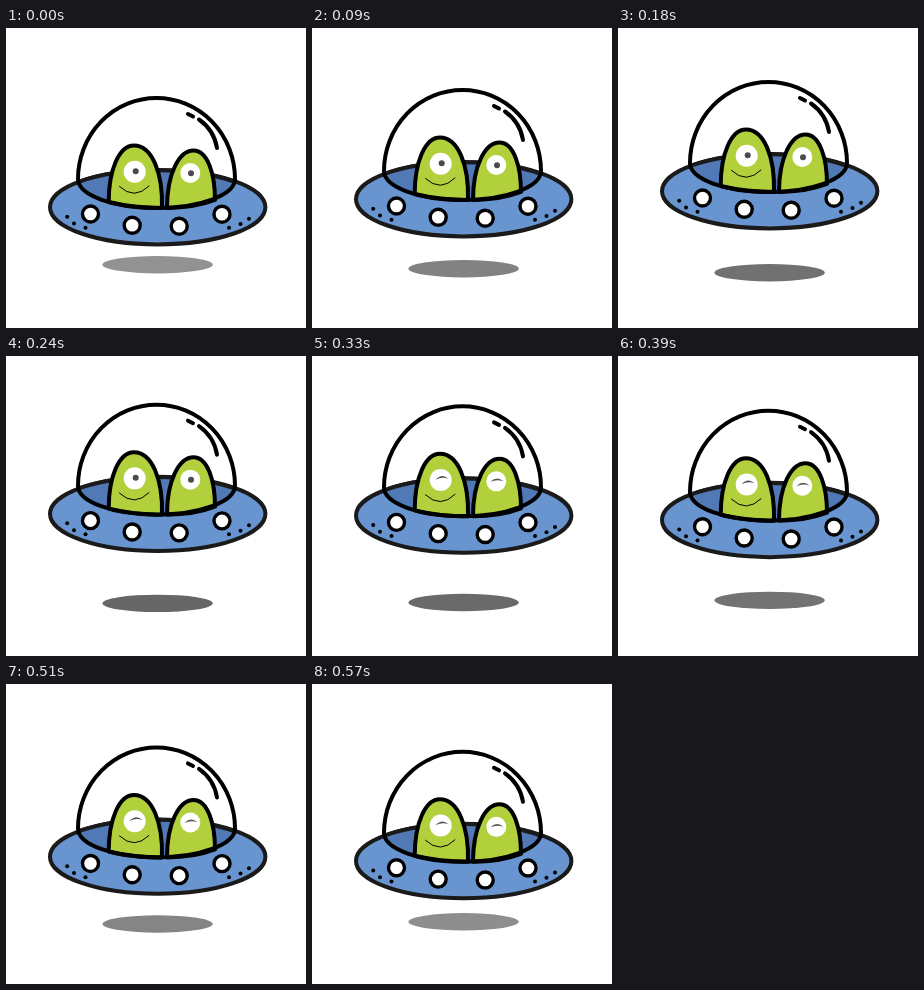
Write an HTML page that moves like this. It is 300 px wide and 300 px high and loops after 0.6 s.

```html
<!DOCTYPE html>
<html lang="en">
<head>
<meta charset="utf-8">
<title>Flying saucer</title>
<style>
html, body { margin: 0; width: 100%; height: 100%; overflow: hidden; background: #fff; }
svg { display: block; width: 100%; height: 100%; }
</style>
</head>
<body>
<svg viewBox="0 0 300 300">
  <ellipse id="shadow" cx="151.6" cy="236.7" rx="55.2" ry="8.7"/>
  <g id="ship" fill="none" stroke="#000" stroke-width="4" stroke-linecap="round" stroke-linejoin="round">
    <ellipse cx="151.7" cy="179.2" rx="107.7" ry="37.2" fill="#6894d0" stroke="#1a1a1a"/>
    <path d="M72.5 153.8A107.7 37.2 0 0 1 228.5 153.8A78.5 29 0 0 1 72.5 153.8Z" fill="#5079b6" stroke="none"/>
    <path d="M72.5 153.8A107.7 37.2 0 0 1 228.5 153.8" stroke="#1a1a1a"/>
    <g fill="#b2d03c">
      <path d="M102.7 174C102.7 142 113 117.5 128 117.5C146 117.5 157 145 156 180Q128 180 102.7 174Z"/>
      <path d="M161 180C161 146 173 122.5 187.5 122.5C202 122.5 209 147 209 172Q188 180 161 180Z"/>
    </g>
    <g fill="#fff" stroke="none">
      <circle cx="128.7" cy="143.7" r="11"/>
      <circle cx="184.3" cy="145" r="10"/>
    </g>
    <g id="open" fill="#4b4b4f" stroke="none">
      <circle cx="129.7" cy="143.2" r="3"/>
      <circle cx="185" cy="145.2" r="3"/>
    </g>
    <g id="shut" fill="#555" stroke="none">
      <path d="M123.5 143.5Q130 136.5 136.5 142.5Q130 140 123.5 143.5Z"/>
      <path d="M178.5 145.5Q185 139 191.5 145Q185 142.5 178.5 145.5Z"/>
    </g>
    <path d="M113.5 158.5Q128.5 172.5 143 158" stroke-width="1"/>
    <path d="M72 151A78.5 81 0 0 1 229 151A78.5 29 0 0 1 72 151Z"/>
    <path d="M182 86L187 88.5M193 91.5Q208 102 211 120"/>
    <g id="ports" fill="#fff" stroke-width="3.4"></g>
    <g id="dots" fill="#000" stroke="none"></g>
  </g>
</svg>
<script>
const STEP = 30, LOOP = 600, PEAK = 270;
const $ = id => document.getElementById(id);
const circles = (points, r) =>
  points.map(([x, y]) => `<circle cx="${x}" cy="${y}" r="${r}"/>`).join("");

$("ports").innerHTML = circles([[84.5, 186], [126.2, 197.3], [173.2, 198.2], [216, 186.2]], 8);
$("dots").innerHTML = circles(
  [[61.2, 188.7], [68, 195.5], [79.5, 199.7], [223, 199.7], [234.5, 196], [243, 190.7]], 2);

function draw(now) {
  const t = Math.floor(now % LOOP / STEP) * STEP;
  const rising = t < PEAK;
  const lift = rising ? t / PEAK : (LOOP - t) / (LOOP - PEAK);
  const gray = Math.round(146 - 49 * lift);

  $("ship").setAttribute("transform", `translate(0 ${-24 * lift})`);
  $("shadow").setAttribute("transform", `translate(0 ${12 * lift})`);
  $("shadow").setAttribute("fill", `rgb(${gray},${gray},${gray})`);
  $("open").setAttribute("visibility", rising ? "visible" : "hidden");
  $("shut").setAttribute("visibility", rising ? "hidden" : "visible");
}

const start = performance.now();
function tick() {
  draw(performance.now() - start);
  requestAnimationFrame(tick);
}
tick();
</script>
</body>
</html>
```
